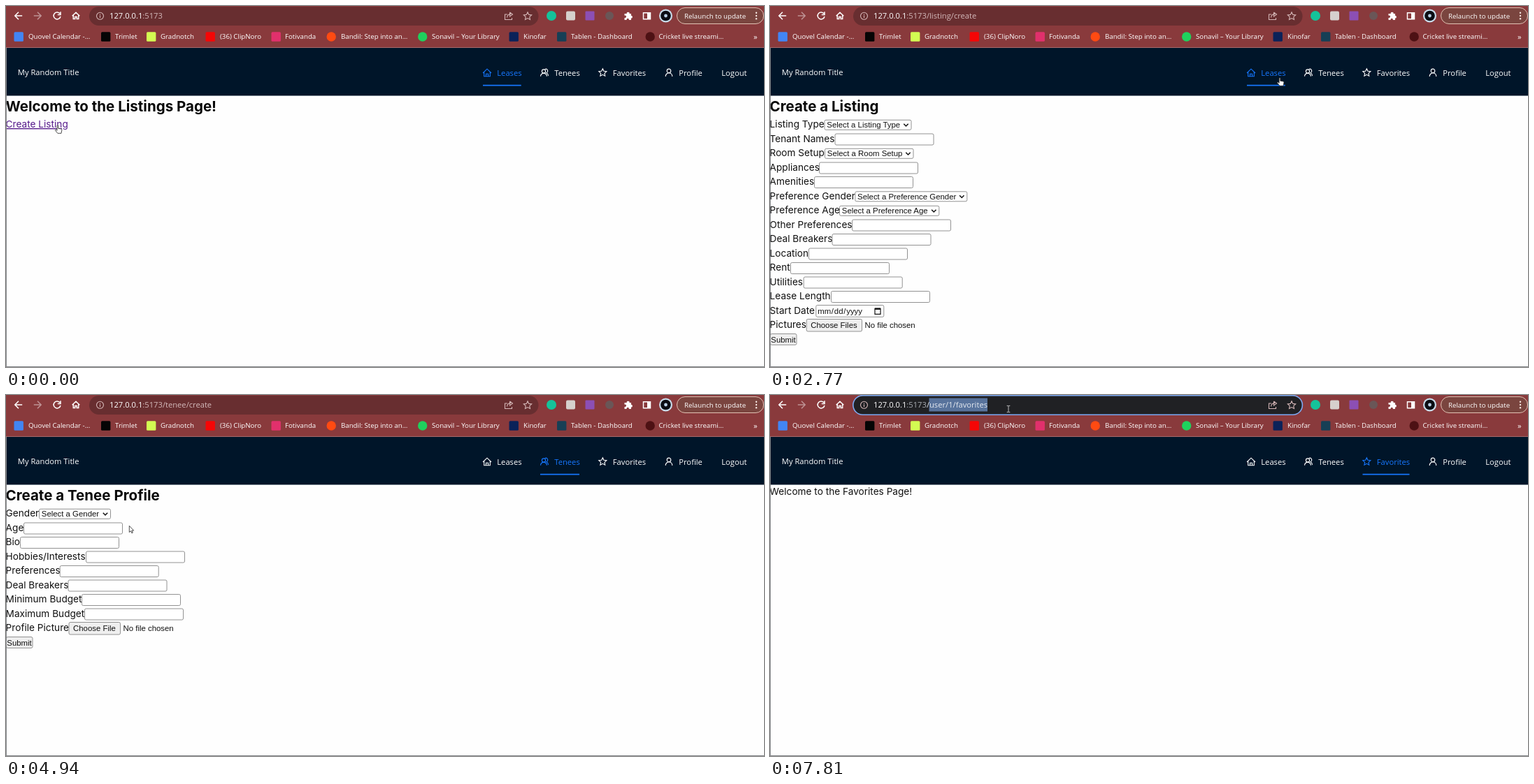
Recreate the animation shown at these times as an HTML page. Size 1084x517 px, loop 8 s.

```html
<!DOCTYPE html>
<html lang="en">
<head>
<meta charset="utf-8">
<title>Listings</title>
<style>
  html, body { margin: 0; width: 100%; height: 100%; overflow: hidden; background: #fefefe; }
  svg { display: block; width: 1084px; height: 517px; }
  text { white-space: pre; }
  .ui { font-family: "Open Sans", "Noto Sans", sans-serif; font-size: 11.2px; fill: #fff; }
  .mark { font-size: 9.7px; }
  .body { font-family: Inter, sans-serif; font-size: 13.65px; fill: #111; }
  .head { font-family: Inter, sans-serif; font-size: 20.53px; font-weight: 700; fill: #080808; }
  .ctl { font-family: "Liberation Sans", Arial, sans-serif; font-size: 11.4px; fill: #111; }
  .link { fill: #551a8b; text-decoration: underline; }
  .line { fill: none; stroke: #fff; stroke-width: 1.5; }
  .soft { fill: none; stroke: #d3b5b5; stroke-width: 1.1; }
  .thin { fill: none; stroke: currentColor; stroke-width: 1.1; }
  .box { fill: #fff; stroke: #868686; stroke-width: .9; }
  .grey { fill: #efefef; }
  .hover { stroke: #3c3c3c; }
</style>
</head>
<body>
<svg id="stage" viewBox="0 0 1084 517"></svg>
<script>
const LOOP = 8000, ROW = 20.5;
const stage = document.getElementById('stage');
const $ = id => document.getElementById(id);

const text = (cls, x, y, s) => `<text class="${cls}" x="${x}" y="${y}">${s}</text>`;
const rect = (x, y, w, h, fill, r = 0) =>
  `<rect x="${x}" y="${y}" width="${w}" height="${h}" rx="${r}" fill="${fill}"/>`;
const disc = (x, y, r, fill) => `<circle cx="${x}" cy="${y}" r="${r}" fill="${fill}"/>`;
const path = (d, cls, x = 0, y = 0, more = '') =>
  `<path class="${cls}" d="${d}" transform="translate(${x} ${y})" ${more}/>`;
const box = (x, y, w, h, kind = '') =>
  `<rect class="box ${kind}" x="${x}" y="${y}" width="${w}" height="${h}" rx="2"/>`;

const star = r => 'M' + Array.from({ length: 10 }, (_, i) => {
  const a = (i / 5 - .5) * Math.PI, q = i % 2 ? r * .48 : r;
  return (q * Math.cos(a)).toFixed(2) + ' ' + (q * Math.sin(a)).toFixed(2);
}).join('L') + 'Z';

// ---- browser frame ----
const marks = [
  [11.5, 'Quovel Calendar -...', '#4285f4', 32],
  [136, 'Trimlet', '#050505', 156],
  [201, 'Gradnotch', '#d3fb52', 221],
  [285.5, '(36) ClipNoro', '#f50606', 306],
  [379.5, 'Fotivanda', '#e1306c', 399],
  [458.5, 'Bandil: Step into an...', '#ff4a12', 479, 1],
  [589, 'Sonavil – Your Library', '#1fd15d', 609, 1],
  [719.5, 'Kinofar', '#0b2259', 740],
  [788, 'Tablen - Dashboard', '#173f55', 808],
  [914.5, 'Cricket live streami...', '#4d1114', 933.5, 1]
];

function browser() {
  return rect(0, 0, 1084, 60, '#893a3c') + rect(0, 59, 1084, 1, '#a56a6b') +
    path('M5.2 0H-5M0-5.2L-5.2 0 0 5.2', 'line', 18, 14) +
    path('M-5.2 0H5M0-5.2L5.2 0 0 5.2', 'line', 45, 14, 'opacity=".45"') +
    path('M4.2-3A5 5 0 1 0 5 1M5-5.8V-1.6H.8', 'line', 73, 14) +
    path('M-5.3 .2L0-4.8 5.3 .2M-3.7-1V4.6H-1.3V1.4H1.3V4.6H3.7V-1', 'line', 100, 14) +
    '<rect id="omni" x="119" y="1" width="642.5" height="27" rx="13.5"/>' +
    '<rect id="ring" x="118.8" y=".7" width="642.6" height="27.6" rx="13.8" fill="none" stroke="#7fa9f1" stroke-width="1.6"/>' +
    path('M5 0A5 5 0 1 1-5 0 5 5 0 1 1 5 0M0-.7V2.8M0-2.8V-1.5', 'soft', 134.5, 14.3) +
    '<rect id="sel" x="227.5" y="4.5" height="19" fill="#58739c"/>' +
    '<text class="ui" x="148" y="18">127.0.0.1<tspan id="port" fill="#d3b9ba">:5173</tspan><tspan id="url" fill="#d3b9ba"></tspan></text>' +
    path('M-2-2.5H-5.5V5H4.5V2.5M-2.5 2C-2-1.5 0-3 3-3M1.5-5.5L5.5-2.5 1.5 .5V-5.5', 'soft', 719, 14.5) +
    path(star(6), 'soft', 746, 14.7) +
    disc(780, 14, 7, '#15c39a') + rect(801, 7.5, 13, 13, '#d6d0cd', 2) +
    rect(828.5, 7.5, 13, 13, '#8c4fb4', 1) + disc(863, 14, 6, '#6a5657') +
    path('M-5.5-3H-2.2A1.9 1.9 0 1 1 1.5-3H4V-.2A1.9 1.9 0 1 1 4 3.6V6H.8A1.7 1.7 0 1 0-2.4 6H-5.5V2.8A1.7 1.7 0 1 0-5.5-.2Z', '', 890, 14, 'fill="#fff"') +
    path('M-5-4.5H5V4.5H-5Z', 'line', 916.5, 14.2) + rect(917, 9.5, 5, 9.5, '#fff') +
    disc(943.5, 14, 9.5, '#c9dcea') + disc(943.5, 14, 7.3, '#0a0d14') + disc(943.5, 14, 2.4, '#b9cfe4') +
    '<rect x="959.5" y="2.5" width="124" height="23" rx="11.5" fill="#7a453f" stroke="#e3c2b4"/>' +
    text('ui mark', 970, 17.5, 'Relaunch to update') +
    [9.8, 14, 18.2].map(y => disc(1073, y, 1.2, '#f3e4de')).join('') +
    marks.map(([x, name, fill, tx, round]) =>
      (round ? disc(x + 6.7, 44, 6.7, fill) : rect(x, 37.3, 13.4, 13.4, fill, 1.5)) +
      text('ui mark', tx, 47.4, name)).join('') +
    text('ui', 1069, 47.5, '»');
}

// ---- site header ----
const user = 'M2.8-2.6A2.8 2.8 0 1 1-2.8-2.6 2.8 2.8 0 1 1 2.8-2.6M-4.8 5.5C-4.8-1.2 4.8-1.2 4.8 5.5';
// icon x, label, label x, line start and end, line on/off, selected on/off
const tabs = [
  { ix: 688, name: 'Leases', tx: 702.3, a: 682, b: 736.7, line: [-999, 3330], on: [-1, 3330],
    icon: 'M-6 .5L0-5.3 6 .5M-4.3-.9V5.3H4.3V-.9M-1.5 5.3V1.7H1.5V5.3' },
  { ix: 770, name: 'Tenees', tx: 784.3, a: 764, b: 820, line: [2960, 5690], on: [3330, 5690],
    icon: 'M1.6-2A2.6 2.6 0 1 1-3.6-2 2.6 2.6 0 1 1 1.6-2M-5.5 5.2C-5-.6 3-.6 3.4 5.2M.8-5A2.6 2.6 0 0 1 3 .2C4.5 1 5.4 2.5 5.6 4.6' },
  { ix: 853.3, name: 'Favorites', tx: 867.8, a: 847.5, b: 914.5, line: [5200, 9999], on: [5690, 9999], icon: star(5.8) },
  { ix: 948, name: 'Profile', tx: 962.3, icon: user },
  { name: 'Logout', tx: 1023.3 }
];

function header() {
  return rect(0, 60, 1084, 68.5, '#001529') + text('ui', 16.8, 98.8, 'My Random Title') +
    tabs.map((t, i) => `<g id="tab${i}">` +
      (t.icon ? path(t.icon, 'thin', t.ix, 95.5) : '') +
      `<text class="ui" style="fill:currentColor" x="${t.tx}" y="99.6">${t.name}</text></g>` +
      (t.a ? `<rect id="bar${i}" x="${t.a}" y="112.8" width="${t.b - t.a}" height="1.7" fill="#1677ff"/>` : '')).join('');
}

// ---- forms ----
function field([label, x, kind, value, end], i) {
  const y = 174 + ROW * i, w = end - x;
  let s = text('body', -.4, y, label);
  if (kind === 'select') {
    s += box(x + .5, y - 10.7, w - 1, 14, 'pick') + text('ctl', x + 3.8, y, value) +
      path('M-3.2-1.7L0 1.6 3.2-1.7', 'line', end - 8, y - 3.6, 'style="stroke:#111"');
  } else if (kind === 'file') {
    s += box(x + .5, y - 12.5, w - 1, 17.5, 'grey pick') + text('ctl', x + 6.5, y, value) +
      text('ctl', end + 3.5, y + .4, 'No file chosen');
  } else if (kind === 'date') {
    s += box(x + .5, y - 12, w - 1, 16.8) +
      [[68.3, 'mm'], [87.8, '/'], [91.8, 'dd'], [105.2, '/'], [109.2, 'yyyy']]
        .map(([tx, v]) => text('ctl', tx, y + .2, v)).join('') +
      path('M-4-3.5H4V4.5H-4Z', 'line', 154, y - 3.7, 'style="stroke:#111;stroke-width:1.2"') +
      rect(150, y - 8, 8, 2.4, '#111');
  } else {
    s += box(x + .5, y - 11.5, 141, 16);
    if (kind === 'number') s += `<g class="spin" display="none">${rect(x + 128, y - 9.6, 11.5, 12.6, '#dcdcdc')}` +
      path('M-3.4-1.6L0-5 3.4-1.6ZM-3.4 1.6L0 5 3.4 1.6Z', '', x + 133.6, y - 3.3, 'fill="#444"') + '</g>';
  }
  return s;
}

function form(title, rows) {
  const y = 174 + ROW * rows.length;
  return text('head', -.5, 151, title) + rows.map(field).join('') +
    box(.5, y - 12, 37.5, 15.8, 'grey pick') + text('ctl', 1.3, y, 'Submit');
}

const landing = (title, link) => text('head', -.5, 151, title) + text('body link', -.4, 174, link);

const pages = [
  { from: 0, url: '', link: 89, body: landing('Welcome to the Listings Page!', 'Create Listing') },
  { from: 200, url: '/listing/create', body: form('Create a Listing', [
    ['Listing Type', 77.5, 'select', 'Select a Listing Type', 202.5],
    ['Tenant Names', 92.5],
    ['Room Setup', 78, 'select', 'Select a Room Setup', 205.5],
    ['Appliances', 70],
    ['Amenities', 63],
    ['Preference Gender', 121.3, 'select', 'Select a Preference Gender', 282.3],
    ['Preference Age', 99, 'select', 'Select a Preference Age', 242.3],
    ['Other Preferences', 117],
    ['Deal Breakers', 88.5],
    ['Location', 55],
    ['Rent', 29, 'number'],
    ['Utilities', 47.7, 'number'],
    ['Lease Length', 87],
    ['Start Date', 65.3, 'date', '', 163.3],
    ['Pictures', 51.7, 'file', 'Choose Files', 132]
  ]) },
  { from: 3330, url: '/tenees', link: 75, body: landing('Welcome to the Tenees Page!', 'Create Post') },
  { from: 4310, url: '/tenee/create', body: form('Create a Tenee Profile', [
    ['Gender', 47, 'select', 'Select a Gender', 150],
    ['Age', 25],
    ['Bio', 20],
    ['Hobbies/Interests', 114],
    ['Preferences', 76.7],
    ['Deal Breakers', 88.5],
    ['Minimum Budget', 108],
    ['Maximum Budget', 112],
    ['Profile Picture', 89.5, 'file', 'Choose File', 164]
  ]) },
  { from: 5690, url: '/user/1/favorites', body: text('body', -.4, 143.4, 'Welcome to the Favorites Page!') }
];

// ---- pointer ----
const route = [
  [0, 73, 171], [200, 73, 171], [520, 140, 235], [830, 222, 319], [890, 219, 328], [1320, 183, 397],
  [1520, 183, 397], [1900, 212, 300], [2300, 91, 91], [2360, 96, 92], [2770, 728, 103], [3140, 783, 101],
  [3330, 783, 101], [3720, 117, 163], [3960, 62, 169], [4310, 62, 169], [4650, 66, 172], [4820, 105, 184],
  [4940, 170, 188], [5000, 545, 150], [5200, 840, 108], [5400, 873, 99], [5620, 873, 99], [5800, 800, 112],
  [5880, 757, 132], [6200, 300, 158], [6420, 79, 155], [6660, 285, 20], [7260, 230, 20], [7440, 230, 20],
  [7810, 341, 20], [LOOP, 341, 20]
];
const FOCUS = 7440;
const shapes = {
  arrow: 'M0 0V9.2L2.1 7.3 3.6 10.4 5 9.8 3.6 6.7H6.4Z',
  hand: 'M0 .6C0-.5 1.7-.5 1.7 .6V4.2L5.8 5C6.8 5.2 7 6 6.8 7L6 11.3H.9L-2.4 7.4C-3.1 6.4-1.9 5.7-1.2 6.3L0 7.4Z',
  beam: 'M-2.3-4.6H-.6L0-4 .6-4.6H2.3M0-4V4M-2.3 4.6H-.6L0 4 .6 4.6H2.3'
};

stage.innerHTML = rect(0, 0, 1084, 517, '#fefefe') + browser() + header() +
  pages.map((p, i) => `<g id="page${i}">${p.body}</g>`).join('') +
  rect(0, 60, 1, 457, '#85878a') + rect(0, 516, 1084, 1, '#85878a') +
  '<path id="pointer" fill="#fff" stroke="#222" stroke-width=".8" stroke-linejoin="round"/>';

pages.forEach((p, i) => {
  p.el = $('page' + i);
  p.boxes = [...p.el.querySelectorAll('.box')].map(el => ({
    el, x: +el.getAttribute('x'), y: +el.getAttribute('y'),
    w: +el.getAttribute('width'), h: +el.getAttribute('height'),
    spin: el.nextElementSibling?.matches('.spin') ? el.nextElementSibling : null
  }));
});

const clamp = v => Math.max(0, Math.min(1, v));

function position(t) {
  const i = route.findIndex(p => p[0] > t);
  const [t0, x0, y0] = route[i - 1], [t1, x1, y1] = route[i];
  const k = (t - t0) / (t1 - t0);
  return [x0 + (x1 - x0) * k, y0 + (y1 - y0) * k];
}

function draw(t) {
  const page = pages.findLast(p => p.from <= t);
  const [x, y] = position(t);
  let shape = 'arrow';

  pages.forEach(p => p.el.setAttribute('display', p === page ? 'inline' : 'none'));
  for (const b of page.boxes) {
    const over = x > b.x && x < b.x + b.w + 4 && y > b.y && y < b.y + b.h;
    b.el.classList.toggle('hover', over);
    if (b.spin) b.spin.setAttribute('display', over ? 'inline' : 'none');
    const typing = x < b.x + b.w - (b.spin ? 14 : 0) && !b.el.matches('.pick');
    if (over && typing) shape = 'beam';
  }

  tabs.forEach((tab, i) => {
    const on = tab.on && t >= tab.on[0] && t < tab.on[1];
    $('tab' + i).style.color = on ? '#1677ff' : '#fff';
    if (tab.line) $('bar' + i).setAttribute('opacity',
      clamp((t - tab.line[0]) / 300) * clamp(1 - (t - tab.line[1]) / 300));
    if (tab.a && x > tab.a && x < tab.b && y > 72 && y < 116) shape = 'hand';
  });
  if (page.link && x < page.link && y > 162 && y < 178) shape = 'hand';
  if (y < 28) shape = 'beam';

  const focus = t >= FOCUS;
  $('omni').setAttribute('fill', focus ? '#202124' : '#682e30');
  $('ring').setAttribute('display', focus ? 'inline' : 'none');
  $('port').setAttribute('fill', focus ? '#a9adb3' : '#d3b9ba');
  $('url').setAttribute('fill', focus ? '#e4e9f0' : '#d3b9ba');
  $('url').textContent = page.url;
  $('sel').setAttribute('width', focus ? Math.max(0, Math.min(311, x) - 227.5) : 0);

  const ptr = $('pointer');
  ptr.setAttribute('d', shapes[shape]);
  ptr.setAttribute('transform', `translate(${x.toFixed(1)} ${y.toFixed(1)})`);
  ptr.setAttribute('fill', shape === 'beam' ? 'none' : '#fff');
  ptr.setAttribute('stroke', shape === 'beam' && y < 60 ? '#e8e8e8' : '#222');
}

function tick() {
  draw(performance.now() % LOOP);
  requestAnimationFrame(tick);
}
tick();
</script>
</body>
</html>
```
